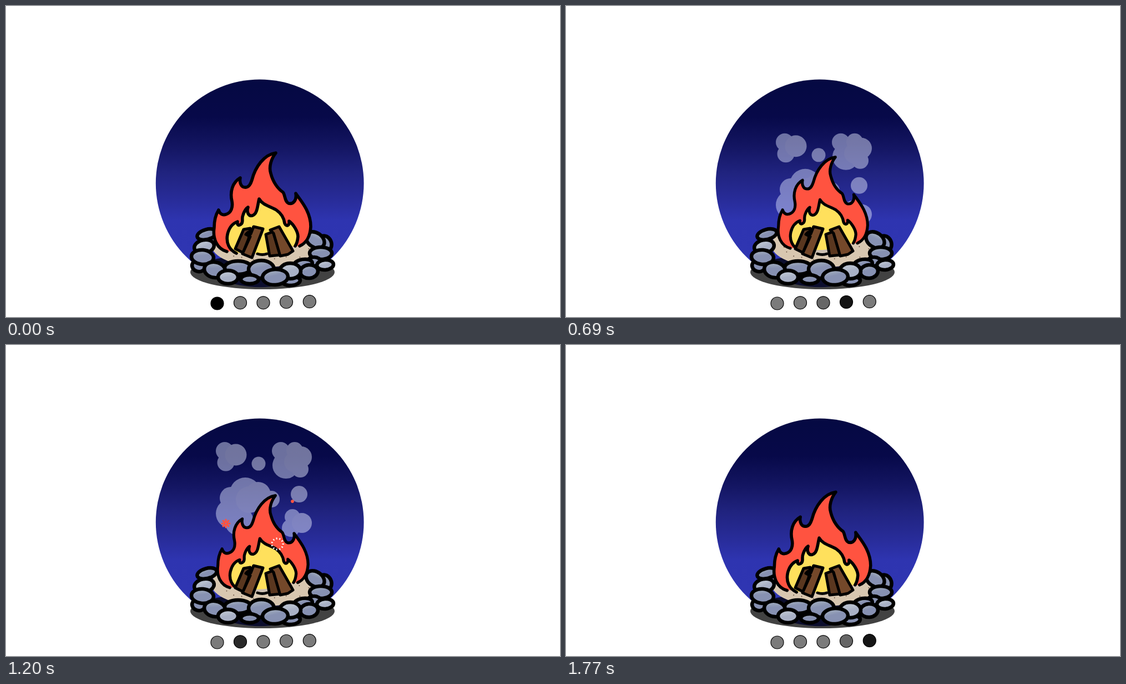
An HTML page for the animation above (1800 ms loop, 998 by 561 pixels).

```html
<!DOCTYPE html>
<html lang="en">
<head>
<meta charset="utf-8">
<title>Campfire</title>
<style>
  html, body { margin: 0; width: 100%; height: 100%; overflow: hidden; background: #fff; }
  svg { display: block; width: 100vw; height: 100vh; }
</style>
</head>
<body>
<svg viewBox="0 0 998 561">
  <defs>
    <linearGradient id="sky" x1="0" y1="0" x2="0" y2="1">
      <stop offset="0" stop-color="#050942"/>
      <stop offset=".18" stop-color="#070949"/>
      <stop offset=".32" stop-color="#131561"/>
      <stop offset=".45" stop-color="#20237f"/>
      <stop offset=".58" stop-color="#282c99"/>
      <stop offset=".68" stop-color="#2e34b0"/>
      <stop offset="1" stop-color="#3036b4"/>
    </linearGradient>
    <linearGradient id="stone" x1="0" y1="0" x2=".3" y2="1">
      <stop offset=".3" stop-color="#98a3b9"/>
      <stop offset=".5" stop-color="#8791b2"/>
    </linearGradient>
    <linearGradient id="pale" x1="0" y1="0" x2=".3" y2="1">
      <stop offset=".4" stop-color="#b7bfce"/>
      <stop offset=".6" stop-color="#a9b1c6"/>
    </linearGradient>
  </defs>

  <circle cx="457.2" cy="319.8" r="187.4" fill="url(#sky)"/>
  <g id="smoke"></g>

  <ellipse cx="462" cy="480" rx="130" ry="31" fill="#000" fill-opacity=".74"/>
  <ellipse cx="466" cy="431" rx="96" ry="40" fill="#d8c7b0"/>
  <g id="specks" fill="#5c4033"></g>
  <ellipse cx="462" cy="443" rx="13" ry="5" fill="#cbbfb2"/>
  <path d="M362 412L354 436L348 464L380 479L420 482L460 484L512 487L545 473L568 462L572 430L552 418"
        fill="none" stroke="#000" stroke-width="18" stroke-linejoin="round"/>
  <g id="stones" stroke="#000" stroke-width="6.5"></g>

  <g id="flame" stroke="#000" stroke-width="5.6" stroke-linecap="round" stroke-linejoin="round">
    <path fill="#ff5340" d="M398 443C380 438 372 420 375 400C375 388 378 376 383 368C385 375 390 378 396 376
      C406 373 409 363 407 352C403 335 408 318 422 310C420 319 424 327 430 327C438 328 441 320 443 314
      C449 290 465 268 486 265C478 275 473 290 477 302C481 318 490 330 499 336C503 341 502 353 509 356
      C518 358 524 350 522 338C530 350 549 370 549 398C548 415 541 428 529 433"/>
    <path fill="#ffe05c" d="M415 446C402 440 396 427 399 412C402 399 409 392 417 389C416 396 420 397 424 393
      C428 389 424 384 427 377C429 371 431 366 436 363C433 372 437 380 444 378C453 375 453 360 456 348
      C463 360 476 361 487 368C497 375 501 384 502 392C505 399 511 396 510 388C518 394 526 407 526 416Q525 427 521 433"/>
    <path fill="#ffe05c" stroke="none" d="M416 444Q470 453 519 431L510 410H420Z"/>
  </g>

  <g stroke="#000" stroke-width="5" stroke-linejoin="round" stroke-linecap="round">
    <path fill="none" d="M453 447Q462 450 470 447"/>
    <path fill="#5a371f" d="M428 403L440 401L437 420L427 445L413 438Z"/>
    <path fill="#74482a" d="M446 398L463 402L443 454L426 447L440 416L432 412L436 408L441 411Z"/>
    <path fill="#5a371f" d="M468 412L481 407L494 449L475 451Z"/>
    <path fill="#74482a" d="M476 404L492 398L517 442L508 448L494 451L482 410Z"/>
  </g>

  <g id="bursts" stroke-linecap="butt"></g>
  <g id="dots" stroke="#000" stroke-width="1.2"></g>
</svg>
<script>
const LOOP = 1800, STEP = 30, BEAT = 180;
const byId = id => document.getElementById(id);
const clamp = u => Math.max(0, Math.min(1, u));
const span = (t, from, to) => clamp((t - from) / (to - from));
const smooth = u => u * u * (3 - 2 * u);

function add(parent, tag, attrs) {
  const el = document.createElementNS("http://www.w3.org/2000/svg", tag);
  for (const key in attrs) el.setAttribute(key, attrs[key]);
  return parent.appendChild(el);
}

// x, y, rx, ry, rotation, pale
[
  [362, 412, 18, 9, -15], [357, 434, 18, 12, -12, 1], [575, 428, 11, 14, -25],
  [557, 422, 18, 13, 35], [347, 469, 12, 10, 15], [354, 453, 20, 13, 5],
  [567, 446, 20, 11, 0], [555, 461, 12, 8, 0], [535, 466, 17, 9, -10],
  [575, 467, 15, 9, -5, 1], [376, 476, 19, 14, 10], [546, 479, 16, 12, -5],
  [418, 472, 24, 12, 0], [514, 496, 16, 8, -5], [460, 475, 23, 16, 0],
  [439, 493, 16, 8, 0], [512, 478, 19, 14, 0, 1], [400, 489, 18, 12, 0, 1],
  [485, 489, 23, 14, -3]
].forEach(([cx, cy, rx, ry, turn, pale]) => add(byId("stones"), "ellipse", {
  cx, cy, rx, ry, transform: `rotate(${turn} ${cx} ${cy})`, fill: `url(#${pale ? "pale" : "stone"})`
}));

for (let i = 0; i < 22; i++) {
  const a = i * 2.4, r = 0.7 + 0.25 * ((i * 0.37) % 1);
  add(byId("specks"), "circle", { cx: 464 + 92 * r * Math.cos(a), cy: 434 + 32 * r * Math.sin(a), r: 0.9 });
}

// x, y, radius
const darkPuffs = [
  [394, 228, 16], [396, 249, 15.5], [449, 251, 6], [495, 228, 16], [504, 254, 24],
  [431, 304, 28], [405, 313, 20], [404, 341, 26], [420, 355, 26],
  [516, 347, 14], [513, 367, 16]
];
const lightPuffs = [
  [414, 235, 19.5], [455, 251, 12.5], [520, 227, 15], [532, 239, 19], [530, 261, 15], [519, 248, 18],
  [438, 316, 24], [454, 307, 23], [478, 315, 15], [528, 306, 15], [533, 358, 18]
];
const puff = fill => ([cx, cy, r]) => add(byId("smoke"), "circle", { cx, cy, r, fill });
darkPuffs.forEach(puff("#dbe2fd"));
lightPuffs.forEach(puff("#e6ebfe"));

const RED = "#ff5340", WHITE = "#fff";
const bursts = [
  { x: 396, y: 322, color: RED, start: 1065, life: 510, reach: 15, rays: 8, width: 3 },
  { x: 516, y: 282, color: RED, start: 1150, life: 450, reach: 11, rays: 8, width: 2.8 },
  { x: 489, y: 359, color: WHITE, start: 1045, life: 350, reach: 15, rays: 11, width: 2 },
  { x: 408, y: 275, color: WHITE, start: 1285, life: 330, reach: 15, rays: 11, width: 2 }
].map(b => ({ ...b, el: add(byId("bursts"), "path", { stroke: b.color, "stroke-width": b.width, fill: "none" }) }));

function drawBurst(b, t) {
  const u = (t - b.start) / b.life;
  let d = "";
  if (u > 0 && u < 1) {
    const outer = b.reach * (1 - (1 - u) ** 2.6);
    const inner = b.color === WHITE ? Math.max(0, outer - 3.2) : 2 * span(u, 0.1, 0.4) + (b.reach - 2) * span(u, 0.5, 1);
    if (outer > inner) for (let i = 0; i < b.rays; i++) {
      const a = i / b.rays * 2 * Math.PI, c = Math.cos(a), s = Math.sin(a);
      d += `M${b.x + inner * c} ${b.y + inner * s}L${b.x + outer * c} ${b.y + outer * s}`;
    }
  }
  b.el.setAttribute("d", d);
}

const dots = [[380.5, 536.5], [422, 535.3], [463.5, 535.3], [505, 534], [546.8, 533.2]]
  .map(([cx, cy]) => add(byId("dots"), "circle", { cx, cy, r: 11.5 }));

function drawDots(t) {
  const phase = t % (5 * BEAT);
  dots.forEach((dot, i) => {
    const dark = i === 0 ? Number(phase <= BEAT) : clamp(1 - Math.abs(phase / BEAT - i - 1));
    const level = Math.round(123 * (1 - dark));
    dot.setAttribute("fill", `rgb(${level},${level},${level})`);
  });
}

function draw(t) {
  const scale = 0.9 + 0.1 * Math.abs(1 - t / 900);
  byId("flame").setAttribute("transform", `translate(476 365) scale(${scale}) translate(-476 -365)`);

  const rise = 25 - 75 * smooth(span(t, 510, 1450));
  byId("smoke").setAttribute("transform", `translate(0 ${rise})`);
  byId("smoke").setAttribute("opacity", span(t, 510, 900) * (1 - span(t, 900, 1470)));

  bursts.forEach(b => drawBurst(b, t));
  drawDots(t);
}

function tick() {
  draw(Math.floor(performance.now() % LOOP / STEP) * STEP);
  requestAnimationFrame(tick);
}
tick();
</script>
</body>
</html>
```
